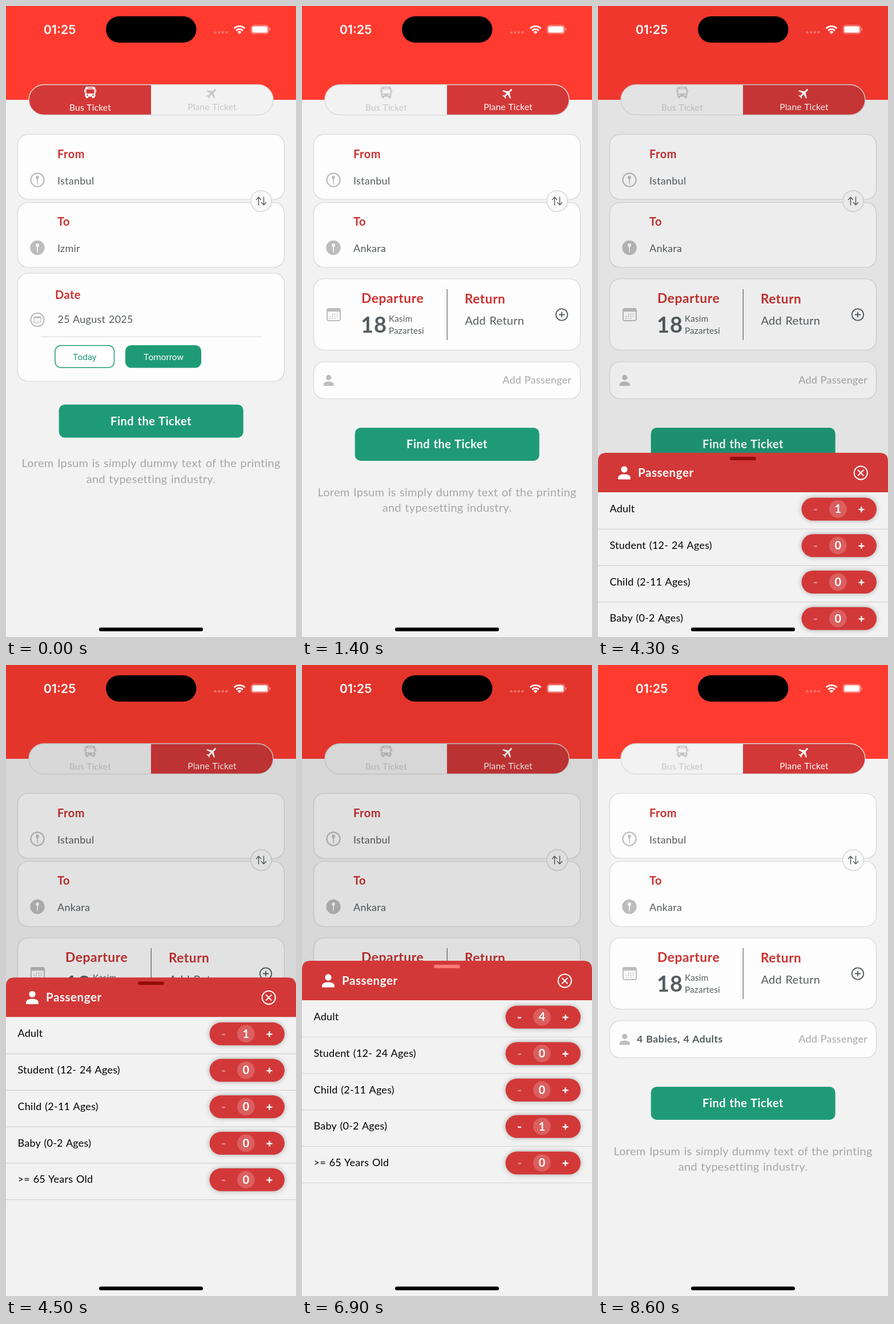
Recreate the animation shown at these times as an HTML page. Size 508 by 1103 pixels, loop 8800 ms.

```html
<!DOCTYPE html>
<html lang="en">
<head>
<meta charset="utf-8">
<title>Ticket search</title>
<style>
  html, body { margin: 0; width: 100%; height: 100%; overflow: hidden; background: #f2f2f2; }
  svg { display: block; width: 508px; height: 1103px; }
  text { font-family: Lato, sans-serif; letter-spacing: .014em; word-spacing: .05em; white-space: pre; }
  .bold { font-weight: 700; letter-spacing: .025em; }
  .mid { text-anchor: middle; }
  .end { text-anchor: end; }
  .clock { font: 600 21.5px Inter, sans-serif; letter-spacing: 0; }
  .chip { font-family: Roboto, sans-serif; letter-spacing: 0; }
  .step { filter: drop-shadow(0 0 4px rgba(0, 0, 0, .3)); }
</style>
</head>
<body>
<svg id="stage" viewBox="0 0 508 1103"></svg>
<script>
const RED = '#d33838', TITLE = '#cb312f', GREEN = '#1f9a77', INK = '#565c5f',
      GREY = '#bdbdbd', PALE = '#a7a7a7', BG = '#f2f2f2', EDGE = '#d5d5d5';
const LOOP = 8800, STEP = 100, SHEET_TOP = 517, SHEET_HEIGHT = 586;
const ROWS = ['Adult', 'Student (12- 24 Ages)', 'Child (2-11 Ages)', 'Baby (0-2 Ages)', '>= 65 Years Old'];
const ADULT = 0, BABY = 3, MAX_PASSENGERS = 8;
const ADULT_TAPS = [5300, 5700, 6100], BABY_TAPS = [6900, 7100, 7300, 7500];

// Markup helpers
const text = (x, y, size, fill, string, cls = '', attrs = '') =>
  `<text x="${x}" y="${y}" font-size="${size}" fill="${fill}" class="${cls}" ${attrs}>${string.replace('>', '&gt;')}</text>`;
const rect = (x, y, w, h, r, fill, attrs = '') =>
  `<rect x="${x}" y="${y}" width="${w}" height="${h}" rx="${r}" fill="${fill}" ${attrs}/>`;
const circle = (x, y, r, fill, attrs = '') =>
  `<circle cx="${x}" cy="${y}" r="${r}" fill="${fill}" ${attrs}/>`;
const line = (d, color, width, attrs = '') =>
  `<path d="${d}" fill="none" stroke="${color}" stroke-width="${width}" ${attrs}/>`;
const group = (id, body, attrs = '') => `<g id="${id}" ${attrs}>${body}</g>`;
const stroke = (color, width) => `stroke="${color}" stroke-width="${width}"`;
const card = (y, h) => rect(20.5, y, 467, h, 18, '#fdfdfd', stroke(EDGE, 1.2));

function pin(y, filled) {
  const color = filled ? '#fff' : GREY;
  return circle(55, y, 11.6, filled ? GREY : 'none', stroke(GREY, 2.2)) +
    circle(55, y - 4.5, 2.9, color) +
    `<path d="M54 ${y - 3}h2l-.4 11h-1.2z" fill="${color}"/>`;
}

const person = (x, y, s, fill) =>
  `<g transform="translate(${x} ${y}) scale(${s})" fill="${fill}"><circle cy="-5" r="4.7"/>
   <path d="M-9 9.5V7C-9 3.5-5 2 0 2S9 3.5 9 7v2.5z"/></g>`;

function calendar(x, y, w, h, width) {
  let dots = '';
  for (let row = 0; row < 3; row++)
    for (let col = 0; col < 4; col++)
      if (row + col > 0 && row + col < 5)
        dots += circle(x + w * (.23 + .18 * col), y + h * (.47 + .17 * row), w * .045, GREY);
  return rect(x, y, w, h, w * .12, 'none', stroke(GREY, width)) +
         rect(x, y, w, h * .25, width / 2, GREY) + dots;
}

const busIcon = `<path fill="currentColor" fill-rule="evenodd" d="M142 141h11q3.5 0 3.5 3.5v14h-1.500v2.500h-4v-2.500h-7v2.500h-4v-2.500h-1.500v-14q0-3.500 3.500-3.500z
  M143 142.700v1.200h9v-1.200z M140.500 145.500v7.500h14v-7.500z M141 154.800v2h3v-2z M151 154.800v2h3v-2z
  M136.900 146h1v5h-1z M157.100 146h1v5h-1z"/>`;
const planeIcon = `<path fill="currentColor" transform="translate(360.5 152.5) rotate(45) translate(-11.5 -12)"
  d="M21 16v-2l-8-5V3.500a1.500 1.500 0 0 0-3 0V9l-8 5v2l8-2.500V19l-2 1.500V22l3.500-1 3.500 1v-1.500L13 19v-5.500z"/>`;

const tabs = `<clipPath id="pill"><rect x="40" y="137.5" width="428" height="53" rx="27"/></clipPath>` +
  rect(40, 137.5, 428, 53, 27, BG) +
  `<g clip-path="url(#pill)">${rect(40, 137, 214, 54, 0, RED, 'id="busFill"')}${rect(254, 137, 214, 54, 0, RED, 'id="planeFill"')}</g>` +
  group('busTab', busIcon + text(147.5, 183, 15.5, 'currentColor', 'Bus Ticket', 'mid')) +
  group('planeTab', planeIcon + text(361, 182, 15.5, 'currentColor', 'Plane Ticket', 'mid')) +
  rect(40, 137.5, 428, 53, 27, 'none', stroke('#dadada', 1.4));

const route = card(224.5, 113.5) + card(343.5, 113.5) + pin(304, false) + pin(422.5, true) +
  text(90, 265.5, 20, TITLE, 'From', 'bold') + text(90, 311.5, 18, INK, 'Istanbul') +
  text(90, 384, 20, TITLE, 'To', 'bold') +
  text(90, 430, 18, INK, 'Izmir', '', 'id="busCity"') + text(90, 430, 18, INK, 'Ankara', '', 'id="planeCity"') +
  circle(447, 341, 18.3, '#fafafa', stroke(EDGE, 1.4)) +
  line('M442.5 348.5v-14m-4.5 4.5l4.5-4.7 4.5 4.7M451.5 333.5v14m-4.5-4.5l4.5 4.7 4.5-4.7', INK, 1.4);

const busForm = card(467, 189) +
  text(86, 512, 20, TITLE, 'Date', 'bold') + text(90.5, 554, 18, INK, '25 August 2025') +
  circle(55, 548.5, 11.6, 'none', stroke(GREY, 2.2)) + calendar(49, 543, 12, 11, 1.2) +
  line('M61 578.2H448', '#dedede', 1.2) +
  rect(86, 593.5, 103.5, 38.5, 10, '#fff', stroke(GREEN, 1.5)) +
  rect(209, 593, 133, 39.5, 10, GREEN) +
  text(137.7, 618.5, 15.4, GREEN, 'Today', 'chip mid') + text(276, 618.5, 15.4, '#fff', 'Tomorrow', 'chip mid');

const planeForm = card(477, 124.5) + card(622, 64.5) + calendar(44, 529, 23, 21, 2) +
  text(104, 519, 22.8, TITLE, 'Departure', 'bold') + text(103, 571, 38, INK, '18', 'bold') +
  text(152, 552, 15.2, INK, 'Kasim') + text(152, 573, 15.2, INK, 'Pazartesi') +
  line('M254.3 495V584', '#777', 1.4) +
  text(285, 520, 22.6, TITLE, 'Return', 'bold') + text(285.5, 556.5, 20, INK, 'Add Return') +
  circle(455, 539.5, 10.2, 'none', stroke(INK, 1.8)) + line('M450 539.5h10m-5-5v10', INK, 1.8) +
  person(46.8, 654.5, 1, GREY) +
  text(68, 660, 17.7, INK, '4 Babies, 4 Adults', 'bold', 'id="summary"') +
  text(472, 660, 18, PALE, 'Add Passenger', 'end');

const findButton = rect(92.7, 696.7, 323, 57.8, 10, GREEN) + text(254, 732.5, 20, '#fff', 'Find the Ticket', 'bold mid');
const note = text(254, 806, 20, PALE, 'Lorem Ipsum is simply dummy text of the printing', 'mid') +
  text(254, 833.5, 20, PALE, 'and typesetting industry.', 'mid');

const statusBar = rect(175, 18, 158.5, 46, 23, '#000') + text(94, 49, 21.5, '#fff', '01:25', 'clock mid') +
  [366.5, 373.2, 379.8, 386.5].map(x => circle(x, 46, 2.2, '#fff', 'opacity=".3"')).join('') +
  line('M399.5 39.3a13.5 13.5 0 0 1 19 0M403 43a8.5 8.5 0 0 1 12 0', '#fff', 2.8) +
  '<path d="M405.3 45.3a5.2 5.2 0 0 1 7.4 0L409 49z" fill="#fff"/>' +
  rect(429.5, 33.5, 30.5, 15, 5, 'none', stroke('#fff', 1.2) + ' stroke-opacity=".5"') +
  rect(431.2, 35.2, 27.1, 11.6, 3.4, '#fff') +
  '<path d="M461.5 38.5q2 .8 2 2.5t-2 2.5z" fill="#fff" opacity=".5"/>';

const passengerRow = (label, i) => `<g transform="translate(0 ${i * 63.75})">` +
  text(20.5, 104, 18, '#000', label) + line('M0 133.3H508', '#d3d3d3', 1.1) +
  rect(356.5, 78.5, 131.5, 40, 20, RED, 'class="step"') + circle(420.3, 98.3, 15.3, '#fff', 'opacity=".2"') +
  text(420.5, 105.3, 20, '#fff', '0', 'bold mid', `id="count${i}"`) +
  line('M378 99.5h6', '#fff', 2.2, `id="minus${i}"`) +
  line('M456.5 99h10m-5-5v10', '#fff', 2.3, `id="plus${i}"`) + '</g>';

const sheet = `<path id="sheetBody" fill="${BG}"/>` +
  `<path d="M0 69V15Q0 0 15 0H493Q508 0 508 15V69z" fill="${RED}"/>` +
  rect(231, 7, 46, 6, 3, '#ff7b78', 'id="handle"') + person(46, 35, 1.2, '#fff') +
  text(70, 42, 20.6, '#fff', 'Passenger', 'bold') +
  circle(460.3, 35, 11.6, 'none', stroke('#fff', 2)) +
  line('M455.8 30.5l9 9m0-9l-9 9', '#fff', 2, 'stroke-linecap="round"') +
  ROWS.map(passengerRow).join('');

document.getElementById('stage').innerHTML =
  rect(0, 0, 508, 1103, 0, BG) + rect(0, 0, 508, 164, 0, '#ff3b30') +
  tabs + route + group('busForm', busForm) + group('planeForm', planeForm) +
  group('find', findButton) + group('note', note) +
  rect(0, 0, 508, 1103, 0, '#000', 'id="dim"') + statusBar + group('sheet', sheet) +
  rect(163, 1086.5, 182, 6.5, 3.2, '#000');

const el = id => document.getElementById(id);
const set = (id, name, value) => el(id).setAttribute(name, value);
const fade = (id, value) => set(id, 'opacity', value);
const shift = (id, y) => set(id, 'transform', `translate(0 ${y})`);
const clamp = v => Math.min(1, Math.max(0, v));
const smooth = v => v * v * (3 - 2 * v);
const tabColor = active => {
  const v = Math.round(198 + 57 * active);
  return `rgb(${v},${v},${v})`;
};

// Critically damped spring, t in ms
function spring(t) {
  const u = Math.max(0, t) * .0145;
  return 1 - (1 + u) * Math.exp(-u);
}

function drawForm(t) {
  const p = smooth(clamp((t - 940) / 440));
  for (const id of ['busFill', 'busForm', 'busCity']) fade(id, 1 - p);
  for (const id of ['planeFill', 'planeForm', 'planeCity']) fade(id, p);
  el('busTab').style.color = tabColor(1 - p);
  el('planeTab').style.color = tabColor(p);
  shift('find', 40.5 * p);
  shift('note', 50.5 * p);
  fade('summary', t >= 8000 ? 1 : 0);
}

function drawCounters(t) {
  const tapped = taps => taps.filter(time => t >= time).length;
  const counts = [1 + tapped(ADULT_TAPS), 0, 0, tapped(BABY_TAPS), 0];
  const total = counts.reduce((a, b) => a + b);
  counts.forEach((count, i) => {
    const least = i === ADULT ? Math.max(1, counts[BABY]) : 0;
    const full = total >= MAX_PASSENGERS || (i === BABY && count >= counts[ADULT]);
    el('count' + i).textContent = count;
    fade('minus' + i, count > least ? 1 : .45);
    fade('plus' + i, full ? .45 : 1);
  });
}

function drawSheet(t) {
  const closing = t >= 8000;
  let open = closing ? 1 - spring(t - 8075) : spring(t - 4173);
  if (t >= 8600) open = 0;
  else if (!closing && t >= 4800) open = 1;
  const r = closing ? 88 : 0;
  set('sheet', 'visibility', open > 0 ? 'visible' : 'hidden');
  shift('sheet', SHEET_TOP + SHEET_HEIGHT * (1 - open));
  set('sheetBody', 'd', `M0 40H508V${SHEET_HEIGHT - r}a${r} ${r} 0 0 1 ${-r} ${r}H${r}a${r} ${r} 0 0 1 ${-r} ${-r}z`);
  set('handle', 'fill', t < 4700 ? '#920c0c' : '#ff7b78');
  fade('dim', .112 * open);
}

function frame() {
  const t = Math.floor(performance.now() % LOOP / STEP) * STEP;
  drawForm(t);
  drawCounters(t);
  drawSheet(t);
  requestAnimationFrame(frame);
}
frame();
</script>
</body>
</html>
```
